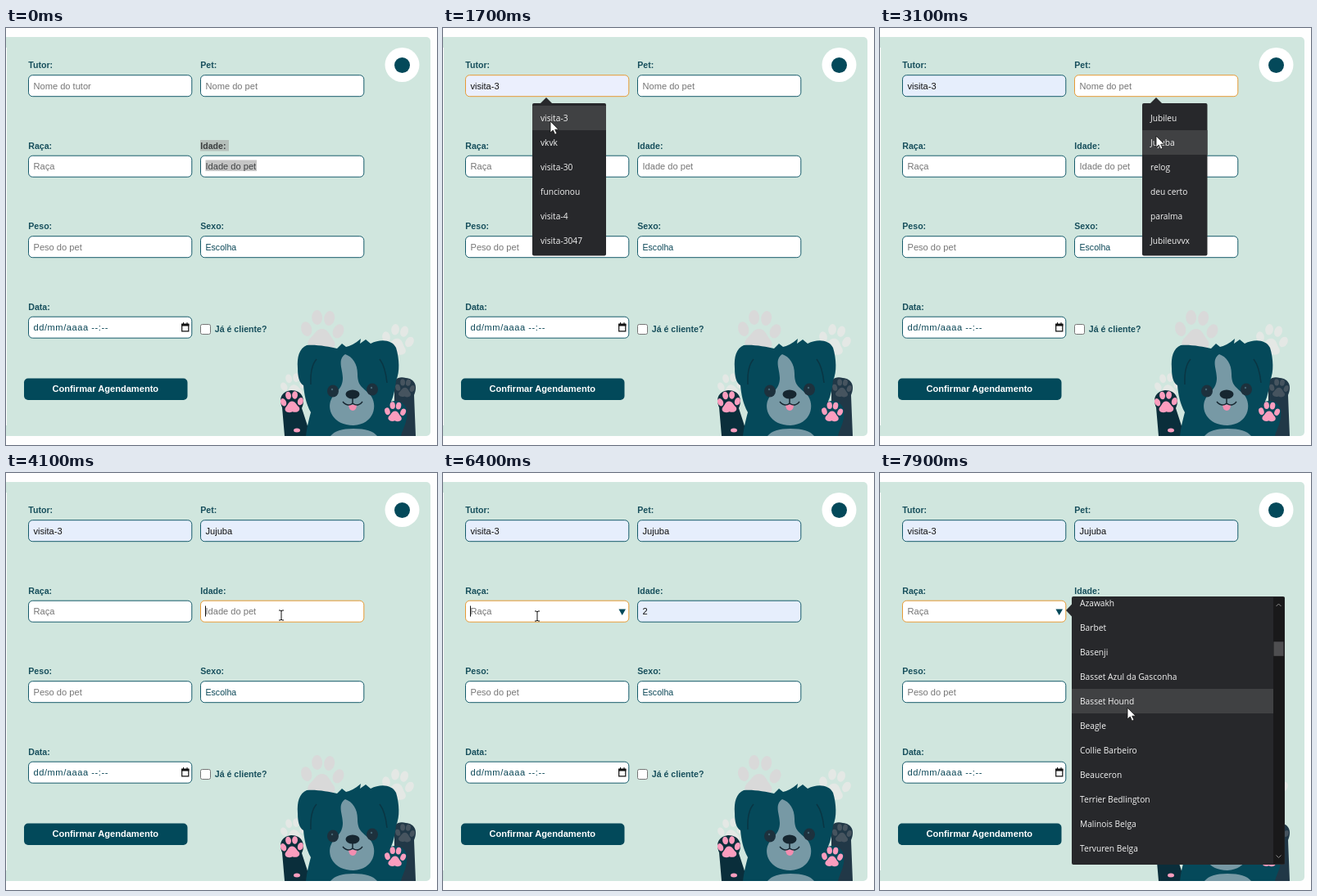
Animation of 526x510 px, one loop 8000 ms. Source, as an HTML page:

```html
<!DOCTYPE html>
<html lang="pt">
<head>
<meta charset="utf-8">
<style>
html, body { margin: 0; width: 100%; height: 100%; overflow: hidden; background: #fefefe; }
svg { display: block; }
text { font: 11.1px "Liberation Sans", Arial, sans-serif; fill: #0b4757; white-space: pre; }
.label { font-weight: bold; font-size: 10.6px; fill: #174f5c; }
.button { font-weight: bold; fill: #fff; }
.hint { fill: #757575; }
.filled { fill: #111; }
.marked { fill: #3c3f40; }
.choice { font-size: 10.6px; }
.date { letter-spacing: .55px; }
.item { font: 10.2px "Open Sans", "Noto Sans", sans-serif; fill: #f4f4f4; }
</style>
</head>
<body>
<svg width="526" height="510" viewBox="0 0 526 510">
  <defs>
    <clipPath id="panel"><rect y="11" width="518" height="488"/></clipPath>
    <clipPath id="list"><rect x="234" y="152" width="246" height="326"/></clipPath>
  </defs>
  <rect x="-8" y="11" width="526" height="488" rx="5" fill="#d0e6de"/>
  <rect y="24" width="1" height="462" fill="#fff"/>
  <circle cx="483.5" cy="45" r="21" fill="#fff"/>
  <circle cx="483.5" cy="45.5" r="9.5" fill="#04495a"/>
  <g id="dog" clip-path="url(#panel)"></g>
  <rect x="22" y="428.5" width="199.500" height="26.500" rx="5" fill="#02495a"/>
  <text class="button" x="56.500" y="445.300">Confirmar Agendamento</text>
  <rect x="237.500" y="362.500" width="12" height="12" rx="2" fill="#fff" stroke="#767676"/>
  <text class="label" x="254.800" y="372">Já é cliente?</text>
  <g id="live"></g>
</svg>
<script>
const LOOP = 8000, STEP = 100, TEAL = '#02495a', DARK = '#27282b', HOVER = '#404143';

const rect = (x, y, w, h, fill, more = '') =>
  `<rect x="${x}" y="${y}" width="${w}" height="${h}" fill="${fill}" ${more}/>`;
const path = (d, fill, more = '') => `<path d="${d}" fill="${fill}" ${more}/>`;
const text = (x, y, cls, s) => `<text x="${x}" y="${y}" class="${cls}">${s}</text>`;
const oval = (x, y, rx, ry, fill, more = '') =>
  `<ellipse cx="${x}" cy="${y}" rx="${rx}" ry="${ry}" fill="${fill}" ${more}/>`;
const paw = (x, y, size, turn, fill) =>
  `<g transform="translate(${x} ${y}) rotate(${turn}) scale(${size})">` +
  path('M0-2C5-2 6 3 10 7C14 13 6 17 0 14C-6 17-14 13-10 7C-6 3-5-2 0-2Z', fill) +
  [[-13, -1, -20], [-5, -11, -6], [5, -11, 6], [13, -1, 20]].map(([a, b, r]) =>
    oval(a, b, 4.3, 6, fill, `transform="rotate(${r} ${a} ${b})"`)).join('') + '</g>';

document.getElementById('dog').innerHTML =
  paw(386, 371, 1.5, 4, '#d9d9d9') +
  paw(478, 382, 1.12, 12, '#e4e8e5') +
  paw(351, 438, .9, -8, '#e4e8e5') +
  path('M337 464C333 454 335 445 348 443C362 443 366 455 361 465L372 499H340Z', '#0a2e3b') +
  path('M474 440C472 428 480 426 488 428C499 429 503 438 498 449L500 499H474Z', '#213847') +
  paw(487, 441, .68, 4, '#46545f') +
  path('M366 499C367 488 370 478 372 470C366 459 364 448 363 437C358 434 356 427 356 416' +
    'C355 402 358 392 367 388C380 387 394 390 404 392L410 386L415 390Q424 388 433 380L432 386L439 381L445 386' +
    'C457 380 471 381 476 391C480 404 481 421 476 431C475 441 473 450 470 457' +
    'C478 454 487 458 489 467C491 481 484 490 482 499Z', '#05495a') +
  path('M372 436Q371 414 379 405M465 434Q463 414 456 405', 'none', 'stroke="#0a3543" stroke-width="1.500"') +
  path('M414 399C423 402 429 411 429 423C429 438 435 439 444 448C455 461 449 485 424 486' +
    'C399 486 391 466 397 454C401 445 411 442 411 428C411 417 404 406 414 399Z', '#7799a5') +
  path('M396 499Q403 490 424 490Q446 490 453 499Z', '#7799a5') +
  oval(399, 444, 7, 7.5, '#1d313d') + oval(447, 442, 7, 7.5, '#1d313d') +
  oval(398, 442, 1.2, 1.2, '#466775') + oval(446, 440, 1.2, 1.2, '#466775') +
  oval(423, 448, 8.5, 5.5, '#162630') +
  path('M418 460Q423 462 428 460Q428 468 423 468Q418 467 418 460Z', '#f38db0') +
  path('M423 451V459M411 457Q417 464 423 459Q430 464 435 457', 'none', 'stroke="#162630" stroke-width="1.500"') +
  paw(349, 458, .8, -3, '#fb9dbe') + paw(475, 470, .74, 3, '#fb9dbe') +
  oval(355, 492, 4, 2.5, '#fb9dbe');

const BREEDS = ('Affenpinscher,Galgo Afegão,Cão de Caça Africano,Airedale Terrier,Cão de Akbash,Akita,' +
  'Buldogue Alapaha Blue Blood,Husky do Alasca,Malamute do Alasca,Buldogue Americano,American Bully,' +
  'Cão Esquimó Americano,Esquimó Americano Miniatura,Foxhound Americano,Pit Bull Terrier Americano,' +
  'Staffordshire Americano,Spaniel d’Água Americano,Pastor da Anatólia,Appenzeller Sennenhund,' +
  'Boiadeiro Australiano,Kelpie Australiano,Pastor Australiano,Terrier Australiano,Azawakh,Barbet,Basenji,' +
  'Basset Azul da Gasconha,Basset Hound,Beagle,Collie Barbeiro,Beauceron,Terrier Bedlington,' +
  'Malinois Belga,Tervuren Belga,Boiadeiro de Berna').split(',');

// focus: [from, to]; fill: time the suggestion appears in the field
const FIELDS = [
  { label: 'Tutor:', hint: 'Nome do tutor', x: 27, y: 57, focus: [500, 2500], fill: 1600, value: 'visita-3' },
  { label: 'Pet:', hint: 'Nome do pet', x: 237, y: 57, focus: [2500, 4100], fill: 3300, value: 'Jujuba' },
  { label: 'Raça:', hint: 'Raça', x: 27, y: 155.5, focus: [6200, LOOP] },
  { label: 'Idade:', hint: 'Idade do pet', x: 237, y: 155.5, focus: [4100, 6200], fill: 5100, value: '2' },
  { label: 'Peso:', hint: 'Peso do pet', x: 27, y: 254 },
  { label: 'Sexo:', fixed: 'Escolha', cls: 'choice', x: 237, y: 254 },
  { label: 'Data:', fixed: 'dd/mm/aaaa --:--', cls: 'date', x: 27, y: 352.5 },
];
const POPUPS = [
  { x: 109, y: 92, w: 90, tip: 126, open: [1100, 1800],
    items: ['visita-3', 'vkvk', 'visita-30', 'funcionou', 'visita-4', 'visita-3047'] },
  { x: 320, y: 92, w: 79.5, tip: 337, open: [2800, 3600],
    items: ['Jubileu', 'Jujuba', 'relog', 'deu certo', 'paralma', 'Jubileuvvx'] },
  { x: 320, y: 190.5, w: 49.5, tip: 337, open: [4300, 5600], items: ['2', '444', '33', '12', '29', 'fd'] },
];
const MOUSE = [
  [100, 300, 200], [500, 125, 72], [1100, 125, 72], [1600, 131, 114], [1900, 131, 114],
  [2500, 330, 72], [2800, 330, 72], [3100, 337, 132], [3700, 337, 132], [4100, 336, 174],
  [4500, 336, 174], [4900, 337, 228], [5300, 336, 215], [5400, 337, 211], [5700, 337, 211],
  [6200, 115, 175], [6500, 115, 175], [6800, 270, 225], [7200, 297, 262], [7900, 302, 287],
];
const LIST_OPEN = 6600, SCROLL_FROM = 7300, SCROLL_TO = 7900, SCROLL = 700;

const within = (t, span) => span && t >= span[0] && t < span[1];
const clamp = v => Math.max(0, Math.min(1, v));

function mouseAt(t) {
  const i = MOUSE.findIndex(k => k[0] > t);
  if (i < 0) return MOUSE[MOUSE.length - 1].slice(1);
  const [t0, x0, y0] = MOUSE[i - 1], [t1, x1, y1] = MOUSE[i];
  const u = (t - t0) / (t1 - t0), e = u * u * (3 - 2 * u);
  return [x0 + (x1 - x0) * e, y0 + (y1 - y0) * e];
}

function field(f, t) {
  const { x, y } = f, focused = within(t, f.focus), filled = t >= f.fill;
  const selected = f.label === 'Idade:' && t < 200;
  const back = !filled ? '#fff' : focused ? '#ebeffd' : '#e6eefc';
  const cls = f.cls || (filled ? 'filled' : selected ? 'marked' : 'hint');
  let s = selected ? rect(x, y - 18.5, 35, 13.5, '#b5bfba') : '';
  s += text(x + .3, y - 8, selected ? 'label marked' : 'label', f.label);
  s += rect(x + .5, y + .7, 199.3, 26, back, `rx="5" stroke="${focused ? '#e69a35' : '#165b6b'}"`);
  if (selected) s += rect(x + 6.5, y + 6, 62.5, 13.5, '#c5c5c5');
  s += text(x + 6.5, y + 17.5, cls, f.fixed || (filled ? f.value : f.hint));
  if (focused && !filled && (t - f.focus[0]) % 1000 < 500) s += rect(x + 6, y + 7, 1, 13, '#111');
  if (focused && f.label === 'Raça:') s += path('M214.500 166.500H223L218.700 174Z', TEAL);
  if (f.label === 'Data:')
    s += path('M214.700 362.500H222.800V370.800H214.700Z', 'none', 'stroke="#111" stroke-width="1.200"') +
      path('M214.100 361.500H223.400V364.500H214.100ZM216 360H217V362H216ZM220.500 360H221.500V362H220.500Z', '#111');
  return s;
}

function popup(p, mx, my) {
  const { x, y, w, tip } = p;
  const over = mx >= x && mx < x + w && my >= y + 3 ? Math.floor((my - y - 3) / 30) : -1;
  return rect(x, y, w, 186.5, DARK, 'rx="2"') + path(`M${tip - 7.5} ${y + .5}L${tip} ${y - 7}L${tip + 7.5} ${y + .5}Z`, DARK) +
    (over >= 0 ? rect(x, y + 3 + over * 30, w, 30, HOVER) : '') +
    p.items.map((item, i) => text(x + 10, y + 22.3 + i * 30, 'item', item)).join('');
}

function breedList(t, mx, my) {
  const scroll = SCROLL * clamp((t - SCROLL_FROM) / (SCROLL_TO - SCROLL_FROM));
  const rowY = i => 154 + i * 30 - scroll;
  const over = mx >= 234 ? rowY(Math.floor((my - 154 + scroll) / 30)) : -99;
  return rect(234, 151, 260, 328, DARK, 'rx="2"') + path('M234.500 160L227 168L234.500 176Z', DARK) +
    `<g clip-path="url(#list)">${rect(234, over, 246, 30, HOVER)}` +
    BREEDS.map((b, i) => text(244, rowY(i) + 19.3, 'item', b)).join('') + '</g>' +
    rect(480, 152, 13.5, 326, '#19191a') + rect(480.5, 168.5 + scroll * .054, 12, 17.5, '#4e4e50') +
    path('M483.500 163L486.500 160L489.500 163M483.500 467.500L486.500 470.500L489.500 467.500', 'none', 'stroke="#8a8a8a"');
}

function pointer(x, y, beam) {
  const at = `transform="translate(${x} ${y})"`;
  return beam
    ? path('M-3-6H-1L0-5L1-6H3M0-5V5M-3 6H-1L0 5L1 6H3', 'none', `stroke="#111" ${at}`)
    : path('M0 0V14L3.300 11L5.600 16.200L8 15.100L5.700 10.200H10Z', '#fff', `stroke="#111" stroke-width=".8" ${at}`);
}

function draw(t) {
  const hasMouse = t >= MOUSE[0][0];
  const [mx, my] = hasMouse ? mouseAt(t) : [0, 0];
  const open = POPUPS.find(p => within(t, p.open));
  const inPopup = open && mx >= open.x && mx < open.x + open.w && my >= open.y || t >= LIST_OPEN && mx >= 234;
  const beam = !inPopup && FIELDS.some(f => f.hint && mx > f.x && mx < f.x + 200 && my > f.y && my < f.y + 27);
  return FIELDS.map(f => field(f, t)).join('') +
    (open ? popup(open, mx, my) : '') +
    (t >= LIST_OPEN ? breedList(t, mx, my) : '') +
    (hasMouse ? pointer(mx, my, beam) : '');
}

const live = document.getElementById('live');
let shown = -1;
function tick() {
  const t = Math.floor(performance.now() % LOOP / STEP) * STEP;
  if (t !== shown) live.innerHTML = draw(shown = t);
  requestAnimationFrame(tick);
}
tick();
</script>
</body>
</html>
```
